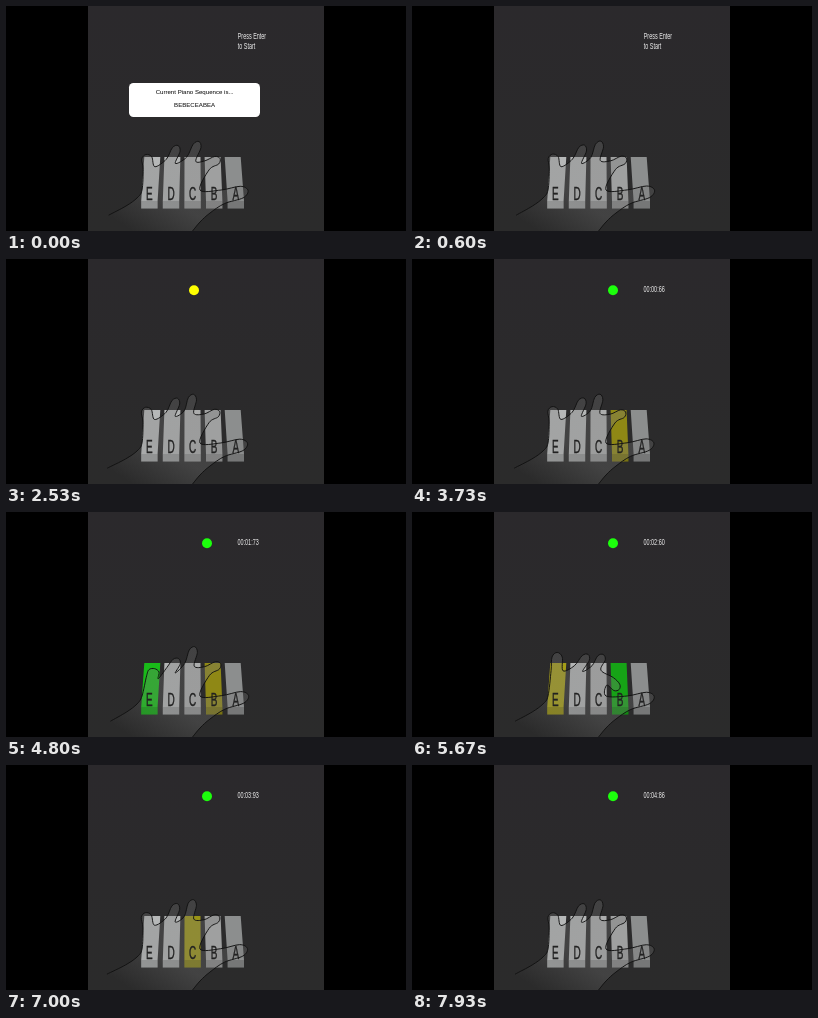
Write an HTML page that moves like this. It is 400 by 225 pixels and loops after 8 s.

```html
<!DOCTYPE html>
<html lang="en">
<head>
<meta charset="utf-8">
<title>Piano sequence</title>
<style>
  html, body { margin: 0; width: 100%; height: 100%; overflow: hidden; background: #000; }
  svg { display: block; width: 100vw; height: 100vh; }
  text { font-family: "Liberation Sans", Arial, sans-serif; }
</style>
</head>
<body>
<svg viewBox="0 0 400 225">
  <defs>
    <linearGradient id="wall" x2="0" y2="1">
      <stop offset="0" stop-color="#2b292c"/>
      <stop offset="1" stop-color="#2b2b2b"/>
    </linearGradient>
    <linearGradient id="skin" gradientUnits="userSpaceOnUse" x1="135" y1="230" x2="160" y2="190">
      <stop offset="0" stop-color="#777" stop-opacity="0"/>
      <stop offset="1" stop-color="#777" stop-opacity=".31"/>
    </linearGradient>
    <clipPath id="room"><rect x="82" width="236" height="225"/></clipPath>
  </defs>
  <rect width="400" height="225"/>
  <g clip-path="url(#room)">
    <rect x="82" width="236" height="225" fill="url(#wall)"/>
    <g id="keys"></g>
    <path id="hand" fill="url(#skin)"/>
    <g id="labels" font-size="17.5" text-anchor="middle" fill="#222" stroke="#222" stroke-width=".4"></g>
    <path id="line" fill="none" stroke="#111" stroke-width=".95" stroke-linejoin="round" stroke-linecap="round"/>
    <circle id="lamp" cy="31.2" r="5"/>
    <g id="prompt" fill="#eee" font-size="8.8">
      <text transform="translate(231.7 33.2) scale(.62 1)">Press Enter</text>
      <text transform="translate(231.7 43.3) scale(.62 1)">to Start</text>
    </g>
    <text id="clock" transform="translate(231.5 33.2) scale(.62 1)" font-size="8.8" fill="#eee"></text>
    <g id="popup" text-anchor="middle" font-size="6.1">
      <rect x="123" y="77" width="131" height="34" rx="4.5" fill="#fff"/>
      <text x="188.6" y="87.6">Current Piano Sequence is...</text>
      <text x="188.6" y="101.1">BEBECEABEA</text>
    </g>
  </g>
</svg>
<script>
const LOOP = 8000, START = 3070, FIRST = 3930, BEAT = 840, GREEN_MS = 380;
const order = "BEBEC";
const pressAt = i => FIRST + i * BEAT;
const $ = id => document.getElementById(id);

function add(parent, tag, attrs) {
  const el = document.createElementNS("http://www.w3.org/2000/svg", tag);
  for (const k in attrs) el.setAttribute(k, attrs[k]);
  return parent.appendChild(el);
}

// The keys fan out slightly towards the viewer and darken to the right.
const keys = [..."EDCBA"].map((name, i) => {
  const k = i - 2, top = 178.5 + 20.1 * k, low = 178.4 + 21.6 * k;
  const front = `M${low} 195h16.4v7.5h-16.4z`;
  const el = add($("keys"), "path", { d: `M${top} 151h16L${low + 16.4} 195H${low}z${front}` });
  add($("keys"), "path", { d: front, fill: "#000", "fill-opacity": .16 });
  add($("labels"), "text", { transform: `translate(${186.6 + 21.6 * k} 193.6) scale(.57 1)` }).textContent = name;
  return { name, el, light: 182 - 2.6 * i * i };
});

const tints = { plain: [1, 1.01, 1.01], next: [.9, .86, .13], hit: [.14, 1.03, .14] };

const ease = x => { x = Math.min(1, Math.max(0, x)); return x * x * (3 - 2 * x); };
const mix = (a, b, f) => a.map((v, i) => v + (b[i] - v) * f);

// How far the finger for a key is pressed, 0 to 1.
function pressed(t, name) {
  let sum = 0;
  for (let i = 0; pressAt(i) < LOOP && i < 4; i++) {
    const dt = t - pressAt(i);
    if (order[i] === name) sum += ease((dt + 230) / 260) * (1 - ease((dt - 190) / 280));
  }
  return sum;
}

// Outline of one finger: up its left side, round the tip, down the right.
function finger(base, tip, wide = 5) {
  const dx = tip[0] - base[0], dy = tip[1] - base[1], len = Math.hypot(dx, dy);
  const side = (f, w) => {
    const [x, y] = mix(base, tip, f);
    return [x - dy / len * w, y + dx / len * w];
  };
  return [side(.4, -wide), side(.85, -wide * .85), tip, side(.85, wide * .85), side(.4, wide)];
}

function smooth(pts) {
  const at = i => pts[Math.min(pts.length - 1, Math.max(0, i))];
  let d = `M${pts[0]}`;
  for (let i = 0; i < pts.length - 1; i++) {
    const handle = (j, sign) => at(j).map((v, k) => v + sign * (at(j + 1)[k] - at(j - 1)[k]) / 6);
    d += `C${handle(i, 1)} ${handle(i + 1, -1)} ${pts[i + 1]}`;
  }
  return d;
}

function drawHand(t) {
  const e = pressed(t, "E"), b = pressed(t, "B"), reach = 1 - ease(t / 700);
  const sx = Math.sin(t / 620) * .6, sy = Math.cos(t / 470) * .5;
  const tip = (x, y) => [x + sx, y + sy];
  const d = smooth([
    [103 + sx * 3, 209], [120 + sx, 200], [131, 192], [136, 184],
    ...finger([145, 171], tip(140 + 8 * e + 5 * b, 148 + 9 * e - 8 * b), 6),
    ...finger([160, 166], tip(172 + 4 * b, 139 + 8 * e + 3 * b)),
    ...finger([180, 165], tip(188 + 3 * b + 5 * reach, 135 + 7 * b)),
    ...finger([192, 164], tip(214 - 7 * b, 152 + 25 * b)),
    [194, 184],
    ...finger([200, 195], tip(242, 184), 7),
    [204, 207], [194, 216], [185, 227]
  ]);
  $("hand").setAttribute("d", d + "L110 227Z");
  $("line").setAttribute("d", d);
}

function drawKeys(t) {
  const done = Math.max(0, Math.floor((t - FIRST) / BEAT) + 1);
  for (const { name, el, light } of keys) {
    let tint = tints.plain;
    if (t >= START && order[done] === name) tint = tints.next;
    if (done && order[done - 1] === name && t < pressAt(done - 1) + GREEN_MS) tint = tints.hit;
    el.setAttribute("fill", `rgb(${tint.map(c => Math.round(c * light))})`);
  }
}

function show(id, on) { $(id).style.display = on ? "" : "none"; }

function render(t) {
  drawHand(t);
  drawKeys(t);
  show("popup", t < 600);
  show("prompt", t < 1070);
  show("lamp", t >= 1070);
  show("clock", t >= START);
  const step = t < 2070 ? 0 : t < START ? 1 : 2;
  $("lamp").setAttribute("cx", 175 + 13 * step);
  $("lamp").setAttribute("fill", ["#f00", "#ff0", "#1cff0c"][step]);
  const cs = Math.max(0, Math.floor((t - START) / 10));
  const two = n => String(n).padStart(2, "0");
  $("clock").textContent = [cs / 6000, cs / 100 % 60, cs % 100].map(n => two(Math.floor(n))).join(":");
}

const began = performance.now();
function tick() {
  render((performance.now() - began) % LOOP);
  requestAnimationFrame(tick);
}
tick();
</script>
</body>
</html>
```
